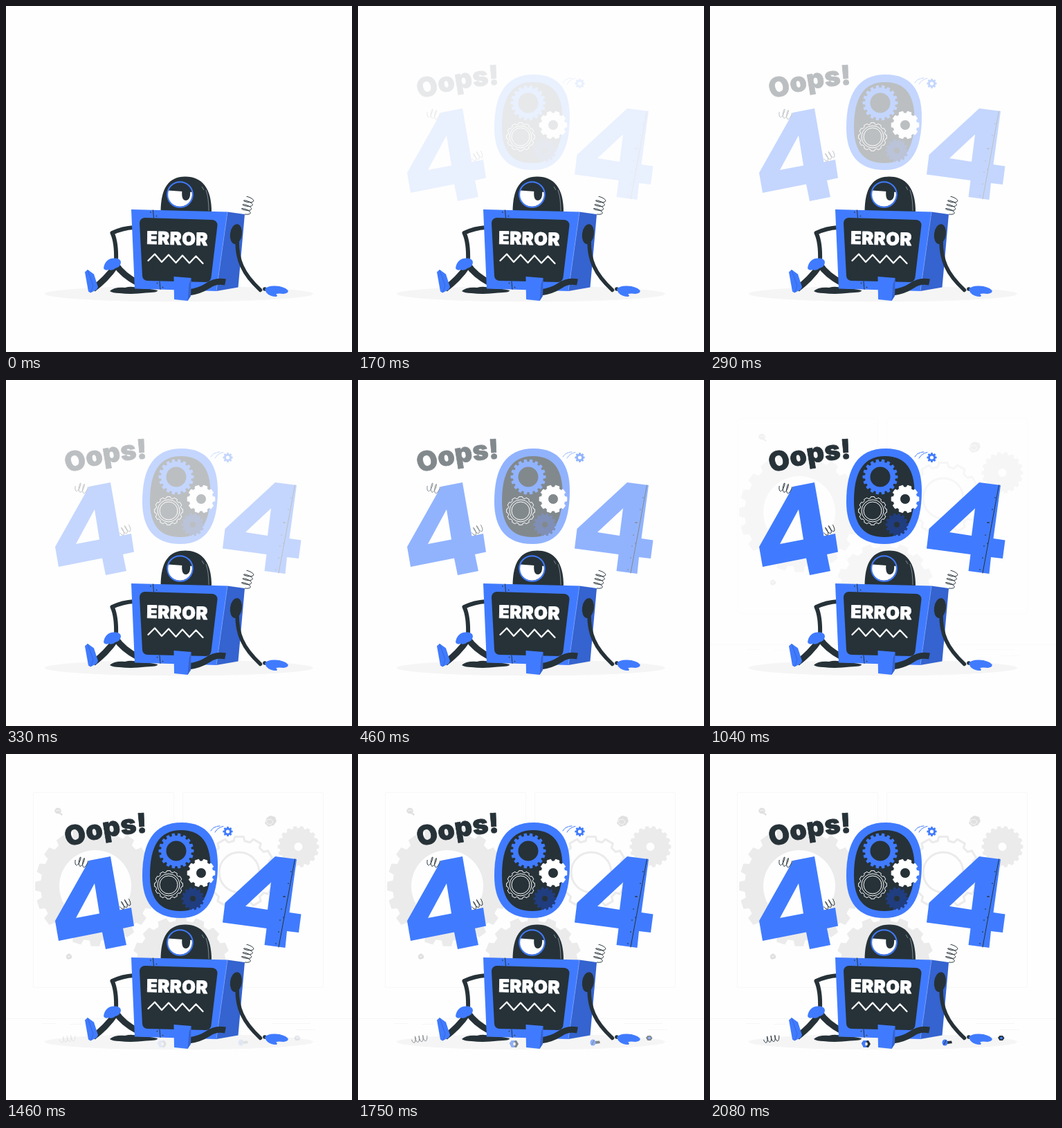
Animation of 500x500 px, one loop 2120 ms. Source, as an HTML page:

```html
<!DOCTYPE html>
<html lang="en">
<head>
<meta charset="utf-8">
<title>Error robot</title>
<style>
  html, body { margin: 0; width: 100%; height: 100%; overflow: hidden; background: #fefefe; }
  svg { display: block; width: 100vw; height: 100vh; }
  text { font-family: Inter, Roboto, "Liberation Sans", sans-serif; font-weight: 900; stroke-linejoin: round; }
  .blue { fill: #407bff; }
  .dark { fill: #263238; }
  .white { fill: #fff; }
  .grey { fill: #ebebeb; }
  .mid { fill: #e0e0e0; }
  .line { fill: none; stroke: #263238; stroke-linecap: round; stroke-linejoin: round; }
  .limb { stroke-width: 6; }
  .leg { stroke-width: 9; stroke-linecap: butt; }
  .thin { stroke-width: 1; }
</style>
</head>
<body>
<svg viewBox="0 0 500 500">
  <defs><path id="arc" d="M89 134.500Q150 115 214 113"/></defs>

  <g id="backdrop">
    <g fill="none" stroke="#f7f7f7" stroke-width="1">
      <rect x="39.500" y="55.500" width="203" height="282" rx="2"/>
      <rect x="255.500" y="55.500" width="203" height="282" rx="2"/>
      <path stroke="#f5f5f5" d="M0 382.500H500M52 389.500H72M92 390.500H110M385 389.500H440M420 398.500H447"/>
    </g>
    <path class="grey" data-gear="129 191 87 79 20 52"/>
    <path class="grey" data-gear="253 306 72 65 16 0"/>
    <path data-gear="337 171 52 46 12 0" fill="none" stroke="#ebebeb" stroke-width="3" stroke-linejoin="round"/>
    <circle cx="337" cy="171" r="29" fill="none" stroke="#ebebeb" stroke-width="3"/>
    <path class="grey" data-gear="422.500 134 30 27 18 6"/>
    <g class="mid">
      <ellipse cx="75" cy="82" rx="4.800" ry="4.300"/>
      <path d="M77 84l5 3-1 2-5-3z"/>
      <path d="M377 92l5-3 7 2 2 6-4 6-8 2-5-5z"/>
      <path d="M87 291l4-3 4 3 0 4-5 2-3-2z"/>
    </g>
    <path d="M72 82l6-1M378 95l5-1 3 4-3 4-5-1-2-4zM89 293l4-1" fill="none" stroke="#f7f7f7"/>
  </g>

  <ellipse cx="250" cy="416" rx="194" ry="11.300" fill="#f5f5f5"/>

  <g id="title">
    <text class="dark" font-size="39" stroke="#263238" stroke-width=".8"><textPath href="#arc">Oops!</textPath></text>

    <path class="blue" fill-rule="evenodd" d="M120 154L151 148 164.500 225.500 181 222 185 248.500 169 252 174 276 144 282 139 257.500 76 270 71 241ZM128 187L101 237 135 230.500Z"/>
    <path class="blue" fill-rule="evenodd" d="M389 148L420 152 409.500 229 426.500 231.500 423 258 406 256 403.500 280 373.500 276 376.500 252 313 243.500 316.500 215ZM383 185.500L346 220 378 225Z"/>
    <path class="line" stroke-width="1" d="M417.500 152L394 279"/>
    <path class="line" stroke-width="1.700" d="M412 170h0M408 187h0M401 206h2M398 224h0M401 236h0M396 240h0M394 257h0M390 274h0"/>

    <path class="blue" d="M254 99C292 99 306 124 306 160 306 208 291 237 252 237 213 237 197 213 197 176 197 128 213 99 254 99Z"/>
    <path class="dark" d="M253 110C284 110 295 131 295.500 161 295.500 203 284 227 252 227 220 227 208 207 208 175 208 134 221 110 253 110Z"/>
    <path class="blue" data-gear="246 140 25.500 22 18 14.500"/>
    <path fill="#203d7f" data-gear="270 209 16.500 14 14 4"/>
    <path class="white" data-gear="282 172 20 17 10 7.500" stroke="#fff" stroke-linejoin="round"/>
    <path data-gear="235 189 20.500 18.500 12 0" fill="none" stroke="#fff" stroke-linejoin="round"/>
    <g fill="none" stroke="#fff" stroke-width="1">
      <circle cx="235" cy="189" r="16"/>
      <circle cx="235" cy="189" r="13"/>
    </g>
    <path class="blue" data-gear="320.500 112 7.200 5.500 8 2.600"/>
    <path fill="none" stroke="#407bff" stroke-linecap="round" d="M296 111Q299 106 304 105M302 113Q306 106 314 104.500M305 104.500L309 104"/>
    <path class="line thin" data-coil="102 154 116 158 2.600 6.500"/>
    <path class="line thin" data-coil="166 220 178 213 2.600 5.500"/>
  </g>

  <g id="robot">
    <path class="dark" d="M150 412Q156 406 172 407 182 404 192 408 208 408 219 411 220 414 202 414.500 182 417 164 415 154 415 150 412Z"/>
    <path class="line thin" data-coil="346 299 351.500 278 3.600 7"/>
    <path class="dark" d="M223.500 298C223.500 263 235 246.500 259 246.500 283 246.500 297.500 263 297 299Z"/>
    <path fill="none" stroke="#8b9398" stroke-width=".9" d="M289 266Q293 277 293 296M283 261L286 266"/>
    <path class="white" d="M234 266.500L269 269A18 18 0 1 1 234 266.500Z"/>
    <path class="dark" d="M254.500 266.500L266 267.500C267 276 264 281 260 281 255 281 253.500 275 254.500 266.500Z"/>
    <circle cx="251.500" cy="272.500" r="18.300" fill="none" stroke="#407bff" stroke-width="2"/>

    <path class="line limb" d="M185 320Q168 321 153.500 328 160 342 159 369"/>
    <path class="line leg" d="M190 400Q169 389 159 374 152 385 143 394 135 402 126 409"/>
    <path class="blue" d="M181 294L320 297.500 304 412 186 408.500Z"/>
    <path fill="#3563cf" d="M320 297.500L345 301 335.500 406.500 304 412Z"/>
    <path fill="none" stroke="#7ba2ff" stroke-width=".7" d="M320 298L304 411.500"/>
    <path class="dark" stroke="#263238" stroke-width="15" stroke-linejoin="round" d="M200.500 313.500L298 316.500 289 391.500 204.500 389.500Z"/>
    <path class="line" stroke-width="1" d="M212.500 295L213.500 306M222 398L223 409.500"/>
    <path class="line" stroke-width="1.700" d="M217.500 303.500h0M218.500 400.500h0M226.500 406.500h0M209 298h0"/>
    <text class="white" font-size="25.400" letter-spacing=".5" stroke="#fff" stroke-width=".8" transform="translate(203 343.800) rotate(1.500)">ERROR</text>
    <path fill="none" stroke="#fff" stroke-width="2.300" stroke-linecap="round" stroke-linejoin="round"
      d="M205.500 368L215 358.500 225 370 235 359.500 245.500 371 255 360.500 265 371.500 274.500 361.500 284.500 372"/>

    <path class="blue" d="M141 379Q143 365 156 364.500 165 364 166 370 166 377 158 379 154 383 148 381 143 383 141 379Z"/>
    <path class="blue" d="M114 384.500L118 381 127 387.500 133 406 131 410 122 414.500 119 412.500Z"/>
    <path fill="none" stroke="#3563cf" stroke-width=".8" d="M118 381.500L126 404 123 413.500"/>

    <path class="line leg" d="M317 399Q303 396 292 404 280 412 264 414"/>
    <path class="blue" d="M242.500 391L267.500 393 267 419 262.500 426 243 424Z"/>
    <path fill="#3563cf" d="M267.500 393L267 419 262.500 426 264.500 402Z"/>

    <ellipse class="dark" cx="332.500" cy="329.500" rx="8.500" ry="14.500" transform="rotate(8 332 329)"/>
    <path class="line" stroke-width="5.500" d="M334 339C334 366 341 386 367.500 410.500"/>
    <circle class="dark" cx="374" cy="409" r="2.800"/>
    <path class="blue" d="M374 409Q378 404 389 404.500 402 405 407.500 411 409 415 401 416 393 415 390 416.500 393 418 391 420 381 420 376 414Z"/>
  </g>

  <g id="parts">
    <path class="line thin" data-coil="79 413 99 410 3.600 4.500"/>
    <path class="dark" d="M219 418L222 414 229 414 232 419 229 424 222 424Z"/>
    <path class="blue" d="M219 418L222 414 227 414 224 419 227 424 222 424Z"/>
    <ellipse class="white" cx="226" cy="419" rx="1.800" ry="2.600"/>
    <path class="dark" d="M342 415L349 414.500 350 418 343 419Z"/>
    <ellipse class="blue" cx="339.500" cy="417" rx="4" ry="4.600"/>
    <path class="line thin" d="M338 420L341 414"/>
    <path class="dark" d="M416 410L418.500 407 423 407 425.500 410.500 423 414 418.500 414Z"/>
    <circle class="blue" cx="421" cy="410.500" r="1.900"/>
  </g>
</svg>

<script>
const LOOP = 2120, STEP = 1000 / 24, FADE = 15;
// group id, step at which its fade begins
const fades = [["title", 2.5], ["backdrop", 19], ["parts", 33.5]];

const toPath = pts => "M" + pts.map(p => p.map(v => v.toFixed(2)).join(" ")).join("L");

function gear(cx, cy, outer, inner, teeth, hole) {
  const pts = [];
  for (let i = 0; i < teeth; i++) {
    for (const [r, k] of [[inner, -.33], [outer, -.23], [outer, .23], [inner, .33]]) {
      const a = (i + k) / teeth * 2 * Math.PI;
      pts.push([cx + r * Math.cos(a), cy + r * Math.sin(a)]);
    }
  }
  const arc = `a${hole} ${hole} 0 1 0 `;
  const cut = hole ? `M${cx - hole} ${cy}${arc}${2 * hole} 0${arc}${-2 * hole} 0Z` : "";
  return toPath(pts) + "Z" + cut;
}

function coil(x0, y0, x1, y1, turns, r) {
  const dx = x1 - x0, dy = y1 - y0, len = Math.hypot(dx, dy);
  const ux = dx / len, uy = dy / len, pts = [];
  const count = Math.round(turns * 20);
  for (let i = 0; i <= count; i++) {
    const a = i / 20 * 2 * Math.PI;
    const along = len * i / count - r * .3 * Math.cos(a);
    const side = r * Math.sin(a);
    pts.push([x0 + ux * along - uy * side, y0 + uy * along + ux * side]);
  }
  return toPath(pts);
}

function build(name, make) {
  for (const el of document.querySelectorAll(`[data-${name}]`)) {
    el.setAttribute("d", make(...el.dataset[name].split(" ").map(Number)));
    el.setAttribute("fill-rule", "evenodd");
  }
}
build("gear", gear);
build("coil", coil);

const groups = fades.map(([id, start]) => [document.getElementById(id), start]);

function draw(now) {
  const step = Math.floor((now % LOOP) / STEP + .05);
  for (const [el, start] of groups) {
    const alpha = Math.min(1, (step - start) / FADE);
    el.style.opacity = alpha < .05 ? 0 : alpha;
  }
}

let origin;
function tick(now) {
  origin ??= now;
  draw(now - origin);
  requestAnimationFrame(tick);
}
draw(0);
requestAnimationFrame(tick);
</script>
</body>
</html>
```
